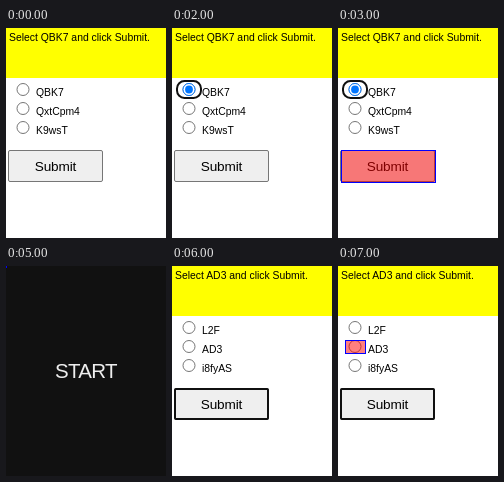
These frames come from a looping animation (160x210 px, 8 s). An HTML page:

```html
<!DOCTYPE html>
<html lang="en">
<head>
<meta charset="utf-8">
<style>
  html, body { margin: 0; width: 100%; height: 100%; overflow: hidden; background: #fff; }
  body { position: relative; font: 10.4px/11px "Liberation Sans", Arial, sans-serif; color: #000; }
  div, svg { position: absolute; box-sizing: border-box; white-space: nowrap; }
  #query { left: 0; top: 0; width: 160px; height: 50px; padding: 4px 3px; background: #ff0; }
  #shapes { left: 0; top: 0; }
  .label { left: 30px; }
  #button { left: 2px; top: 122px; width: 95px; height: 32px; border: 1px solid #767676; border-radius: 2px;
    background: #efefef; font-size: 13.6px; letter-spacing: -.15px; line-height: 32px; text-align: center; }
  #button.focus { outline: 2px solid #101010; outline-offset: -2px; }
  #mark { border: 1px solid #00f; background: rgba(255, 0, 0, .5); background-clip: padding-box; }
  #cover { left: 0; top: 0; width: 160px; height: 210px; background: #111; color: #eee;
    font-size: 20.5px; letter-spacing: -.7px; line-height: 209px; text-align: center; }
  #dot { left: 0; top: 0; width: 1px; height: 2px; background: #00f; }
</style>
</head>
<body>
<div id="query"></div>
<svg id="shapes" width="160" height="210" fill="none">
  <g id="radios" fill="#fff" stroke="#767676">
    <circle cx="17" cy="61.5" r="6"/>
    <circle cx="17" cy="80.5" r="6"/>
    <circle cx="17" cy="99.5" r="6"/>
  </g>
  <g id="checked">
    <circle cx="17" cy="61.5" r="6" fill="#fff" stroke="#0075ff"/>
    <circle cx="17" cy="61.5" r="3.9" fill="#0075ff"/>
    <rect x="5" y="53" width="24" height="17" rx="7.5" stroke="#101010" stroke-width="2"/>
  </g>
</svg>
<div class="label" style="top:59px"></div>
<div class="label" style="top:78px"></div>
<div class="label" style="top:97px"></div>
<div id="button">Submit</div>
<div id="mark"></div>
<div id="cover">START<div id="dot"></div></div>
<script>
const $ = id => document.getElementById(id);
const labels = document.querySelectorAll('.label');
const tasks = [
  { answer: 'QBK7', options: ['QBK7', 'QxtCpm4', 'K9wsT'] },
  { answer: 'AD3', options: ['L2F', 'AD3', 'i8fyAS'] }
];
// Highlight boxes by second: x, y, width, height
const marks = { 1: [7, 55, 21, 14], 3: [3, 122, 95, 33], 7: [7, 74, 21, 14] };
let shown = -1;

const show = (id, on) => $(id).style.display = on ? '' : 'none';

function render(step) {
  const second = step >= 6;
  const task = tasks[+second];
  $('query').textContent = `Select ${task.answer} and click Submit.`;
  labels.forEach((label, i) => label.textContent = task.options[i]);
  $('button').className = second ? 'focus' : '';
  show('checked', step === 2 || step === 3);
  show('cover', step === 4 || step === 5);
  show('dot', step === 5);
  const box = marks[step];
  show('mark', box);
  if (box) ['left', 'top', 'width', 'height'].forEach((side, i) => $('mark').style[side] = box[i] + 'px');
}

function tick() {
  const step = Math.floor(performance.now() / 1000) % 8;
  if (step !== shown) render(shown = step);
  requestAnimationFrame(tick);
}
tick();
</script>
</body>
</html>
```
